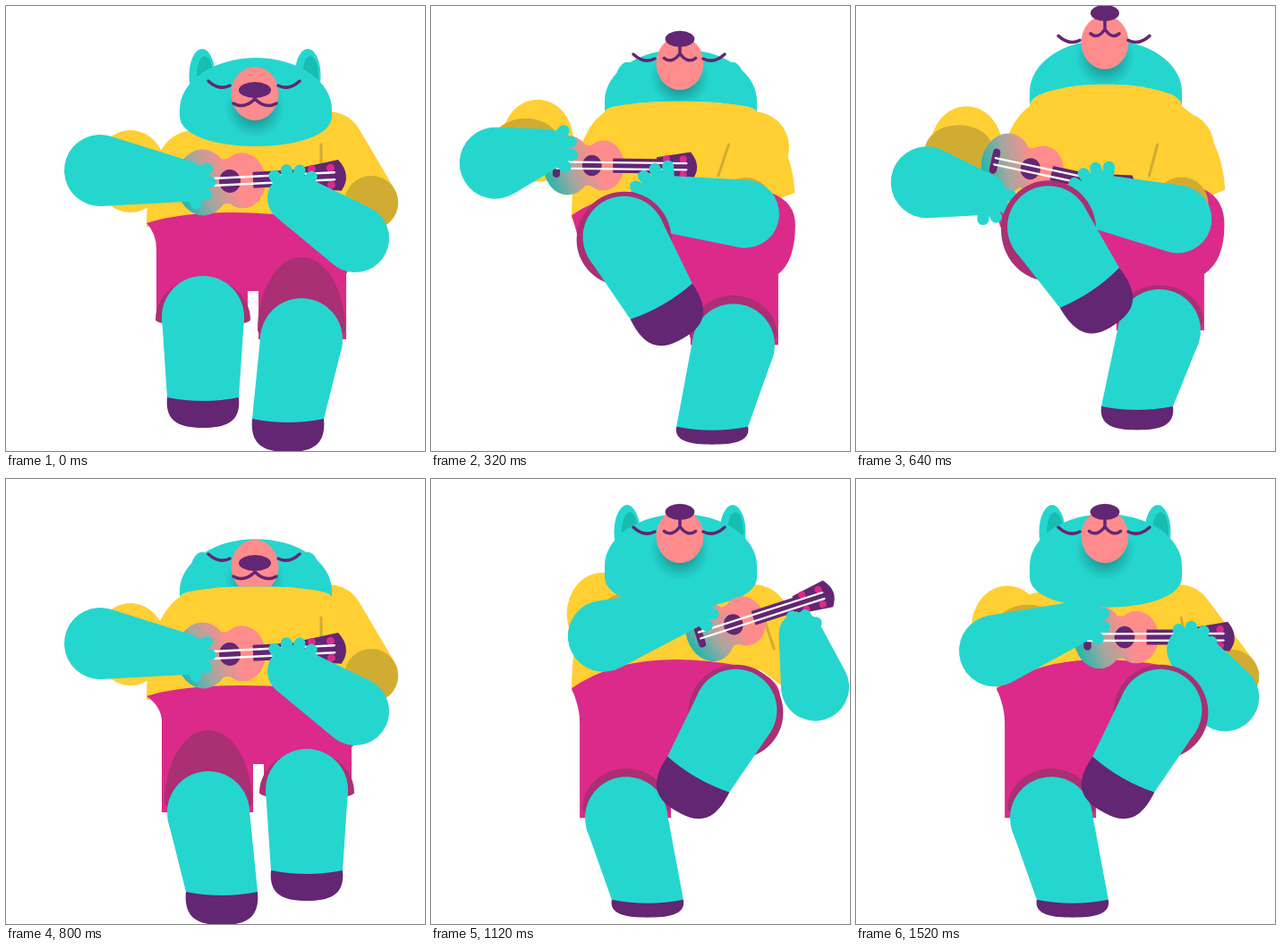
These frames come from a looping animation (468x498 px, 1.6 s). An HTML page with a canvas:

```html
<!DOCTYPE html>
<html lang="en">
<head>
<meta charset="utf-8">
<title>Dancing bear</title>
<style>
  html, body { margin: 0; width: 100%; height: 100%; overflow: hidden; background: #fff; }
  canvas { display: block; }
</style>
</head>
<body>
<canvas id="stage" width="468" height="498"></canvas>
<script>
const ctx = document.getElementById('stage').getContext('2d');
const TEAL = '#25d6cf', TEAL_DARK = '#17bdb0', YELLOW = '#ffcf33', MUSTARD = '#d1ac33',
      PINK = '#dc2a8a', PLUM = '#aa2f73', PURPLE = '#632673', SALMON = '#ff8c8c';
const { PI, sin, cos, abs, max, min, sqrt, sign } = Math;
const LOOP = 1600, STEP = 80, BEAT = 5; // one beat is five steps
const AXIS = 556;                       // x + mirrored x
const ANKLE = 40;                       // half width of an ankle

const mix = (a, b, u) => a + (b - a) * u;

function fill(color, draw) {
  ctx.beginPath();
  draw();
  ctx.closePath();
  ctx.fillStyle = color;
  ctx.fill();
}
function stroke(color, width, draw) {
  ctx.beginPath();
  draw();
  ctx.lineCap = ctx.lineJoin = 'round';
  ctx.lineWidth = width;
  ctx.strokeStyle = color;
  ctx.stroke();
}
function within(place, draw) {
  ctx.save();
  place();
  draw();
  ctx.restore();
}
const line = (x1, y1, x2, y2) => { ctx.moveTo(x1, y1); ctx.lineTo(x2, y2); };
const oval = (color, x, y, rx, ry = rx) => fill(color, () => ctx.ellipse(x, y, rx, ry, 0, 0, 2 * PI));

// Hull of two circles
function capsule(color, a, b) {
  const axis = Math.atan2(b.y - a.y, b.x - a.x);
  const bend = Math.acos((a.r - b.r) / Math.hypot(b.x - a.x, b.y - a.y));
  fill(color, () => {
    ctx.arc(a.x, a.y, a.r, axis + bend, axis - bend + 2 * PI);
    ctx.arc(b.x, b.y, b.r, axis - bend, axis + bend);
  });
}

// Sideways swing of arms and ukulele: left in the first half, right in the second
function sway(t) {
  const v = -sin(2 * PI * t / LOOP);
  return sign(v) * sqrt(abs(v));
}

function getPose(t) {
  const step = t / STEP, beat = step % BEAT, c = beat / BEAT;
  const swing = sway(t), reach = abs(swing);
  const turn = 2 * PI * t / LOOP;
  return {
    swing, reach,
    flipped: t >= LOOP / 2,
    lift: sin(PI * c) ** .25,
    bounce: cos(2 * PI * (c + .15)),
    point: sin(2 * PI * c),
    nod: ((c - .48) / .48) ** 2,
    strum: -30 * cos(PI * beat) * sin(PI * c),
    lean: max(0, -sway(t - 2 * STEP)),
    tilt: -.05 + .17 * (sin(turn) - sin(2 * turn)),
    rock: sin(2 * turn)
  };
}

// Legs are set out with the left one lifted; the second half mirrors them.
function getLegs({ lift, bounce, point, flipped }) {
  const shin = .6 * lift, length = 90 - 8 * lift;
  const lifted = {
    x: mix(220, 215, lift), y: mix(348, 246, lift), flip: 1, tilt: shin,
    ankleX: sin(shin) * length, ankleY: cos(shin) * length, foot: 34 + 16 * lift,
    cuff: { y: 3, rx: 53, up: 47 + 8 * lift, down: 8 + 50 * lift }
  };
  const planted = {
    x: mix(330, 339, lift), y: 363 + 17 * bounce, flip: 1, tilt: 0,
    ankleX: mix(-15, -25, lift), ankleY: 85 + 7 * bounce, foot: 37 + 18 * point,
    cuff: { y: -10, rx: 49, up: 40 + 42 * (1 - lift), down: 10 }
  };
  if (flipped) for (const leg of [lifted, planted]) {
    leg.x = AXIS - leg.x;
    leg.flip = -1;
  }
  const [left, right] = flipped ? [planted, lifted] : [lifted, planted];
  return { lifted, planted, left, right };
}

function drawLeg({ x, y, flip, tilt, ankleX, ankleY, foot, cuff }) {
  within(() => { ctx.translate(x, y); ctx.scale(flip, 1); }, () => {
    fill(PLUM, () => {
      ctx.ellipse(0, cuff.y, cuff.rx, cuff.up, 0, PI, 0);
      ctx.ellipse(0, cuff.y, cuff.rx, cuff.down, 0, 0, PI);
    });
    within(() => { ctx.translate(ankleX, ankleY); ctx.rotate(-tilt); }, () => fill(PURPLE, () => {
      ctx.moveTo(-ANKLE, 0);
      ctx.bezierCurveTo(-ANKLE - 3, foot * .85, -24, foot, 0, foot);
      ctx.bezierCurveTo(24, foot, ANKLE + 3, foot * .85, ANKLE, 0);
    }));
    const axis = Math.atan2(ankleX, ankleY), r = 46;
    const ax = ANKLE * cos(tilt), ay = ANKLE * sin(tilt);
    oval(TEAL, 0, 0, r);
    fill(TEAL, () => {
      ctx.moveTo(r * cos(axis), -r * sin(axis));
      ctx.lineTo(-r * cos(axis), r * sin(axis));
      ctx.lineTo(ankleX - ax, ankleY + ay);
      ctx.quadraticCurveTo(ankleX + 8 * sin(tilt), ankleY + 8 * cos(tilt), ankleX + ax, ankleY - ay);
    });
  });
}

function drawArm(elbow, hand, direction, length) {
  capsule(TEAL, elbow, hand);
  for (let i = -1.5; i < 2; i++) {
    const a = direction + i * 15 / length;
    stroke(TEAL, 13, () => line(hand.x, hand.y, hand.x + cos(a) * length, hand.y + sin(a) * length));
  }
}

function drawUkulele({ x, y, scale }, tilt) {
  within(() => { ctx.translate(x, y); ctx.rotate(tilt); ctx.scale(scale, scale); }, () => {
    const wood = ctx.createLinearGradient(-55, 20, 15, -8);
    wood.addColorStop(0, '#22b7ac');
    wood.addColorStop(.4, '#a5a79f');
    wood.addColorStop(.85, SALMON);
    oval(wood, -30, 0, 30, 37);
    oval(wood, 14, 0, 26, 31);
    fill(wood, () => ctx.rect(-20, -25, 25, 50));
    oval(PURPLE, 0, 0, 12, 13);
    stroke(PURPLE, 9, () => line(-44, -11, -44, 11));
    fill(PURPLE, () => ctx.rect(26, -9, 58, 18));
    fill(PURPLE, () => {
      ctx.moveTo(80, -11);
      ctx.lineTo(122, -18);
      ctx.quadraticCurveTo(137, 0, 124, 17);
      ctx.lineTo(80, 12);
    });
    for (const px of [92, 113]) for (const py of [-9, 10]) oval(PINK, px, py, 4.5);
    for (const sy of [-4, 4]) stroke('#fff', 2.5, () => line(-44, sy, 117, sy));
  });
}

function drawTorso({ neck, sag }, waist, lean) {
  const droop = max(sag, 0), left = 194 + droop / 4, right = 364 - droop / 4;
  const top = neck + droop / 2, rise = top + min(sag, 0) * 4 / 3;
  const side = 385 + 28 * lean;
  fill(YELLOW, () => {
    ctx.moveTo(left, top);
    ctx.bezierCurveTo(left, rise, right, rise, right, top);
    ctx.quadraticCurveTo(side - 4, neck + 30, side, waist.y);
    ctx.lineTo(waist.x, waist.y + 10);
    ctx.lineTo(157, waist.leftY + 4);
    ctx.quadraticCurveTo(157, neck + 25, left, top);
  });
}

function drawShorts(waist, { left, right }, lean) {
  const hip = 390 + 22 * lean, crotch = 319;
  const outerLeft = left.x - 52, outerRight = right.x + 50;
  fill(PINK, () => {
    ctx.moveTo(157, waist.leftY);
    ctx.quadraticCurveTo(225, waist.arch, waist.x, waist.y);
    ctx.quadraticCurveTo(hip, waist.y + 10, hip, 245);
    ctx.quadraticCurveTo(hip, 285, outerRight, min(300, right.y));
    ctx.lineTo(outerRight, right.y);
    ctx.lineTo(right.x - 48, right.y);
    ctx.lineTo(right.x - 48, crotch);
    ctx.lineTo(left.x + 50, crotch);
    ctx.lineTo(left.x + 50, left.y);
    ctx.lineTo(outerLeft, left.y);
    ctx.lineTo(outerLeft, min(272, left.y));
    ctx.quadraticCurveTo(outerLeft, 255, 157, waist.leftY);
  });
}

function drawEars({ top }, lean) {
  const y = top + 20 + 32 * lean;
  for (const x of [219, 337]) {
    oval(TEAL, x, y, 14.5, 30);
    oval(TEAL_DARK, x + 3, y, 9, 22);
  }
}

function drawHead({ neck, sag, top }, nod) {
  const snap = nod * nod; // the nose drops late in the nod
  const muzzle = 37 + 61 * nod, nose = muzzle - 33 + 29 * snap;
  const mouth = muzzle - 12 + 21 * snap, half = 16 + 8 * snap, eyes = muzzle - 3 - 7 * nod;
  const dip = neck + sag * 4 / 3;
  fill(TEAL, () => {
    ctx.ellipse(279, top + 58, 85, 58, 0, PI, 0);
    ctx.lineTo(364, neck);
    ctx.bezierCurveTo(364, dip, 194, dip, 194, neck);
  });
  const shadowY = muzzle + 16;
  const shade = ctx.createRadialGradient(278, shadowY, 12, 278, shadowY, 34);
  shade.addColorStop(0, 'rgba(20, 105, 105, .6)');
  shade.addColorStop(1, 'rgba(20, 140, 140, 0)');
  // Nothing of the face reaches below the collar.
  within(() => { ctx.beginPath(); ctx.rect(194, 0, 170, neck + sag); ctx.clip(); }, () => {
    oval(shade, 278, shadowY, 34);
    oval(SALMON, 278, muzzle, 26.5, 30);
  });
  stroke(PURPLE, 3.5, () => {
    line(278, nose, 278, mouth - 3);
    for (const dir of [-1, 1]) {
      ctx.moveTo(278, mouth - 3);
      ctx.quadraticCurveTo(278 + dir * half / 2, mouth + 9, 278 + dir * half, mouth + 2);
      const eye = 277 + dir * 39;
      ctx.moveTo(eye + dir * 12, eyes - 4);
      ctx.quadraticCurveTo(eye, eyes + 7, eye - dir * 12, eyes + 1);
    }
  });
  oval(PURPLE, 278, nose, 16 + 2 * snap, 9);
}

function draw() {
  const pose = getPose(Math.floor(performance.now() % LOOP / STEP) * STEP);
  const { swing, reach, lift, nod, lean, strum, tilt, rock } = pose;
  const legs = getLegs(pose);
  const head = { neck: 99 + 24 * nod + 12 * lean, sag: 34 - 60 * lean, top: 24 + 34 * nod + 12 * lean };
  const waist = { x: 345 + 45 * lean, y: 238 - 33 * lift, leftY: 243 - 10 * lift, arch: 222 - 40 * lift };
  const ukulele = { x: 250 + 81 * swing + 9 * reach, y: 196 - 26 * reach - 8 * swing, scale: 1 - .1 * reach };

  const leftElbow = { x: 105 + 62 * swing + 28 * reach, y: 184 - 14 * rock, r: 40 };
  const leftHand = { x: ukulele.x - 50, y: ukulele.y + strum, r: 23 };
  const rightElbow = { x: 390 + 40 * swing, y: 260 - 28 * reach, r: 38 };
  const rightHand = { x: 320 + 75 * swing + 20 * reach, y: 215 - 18 * reach - 25 * swing, r: 28 - 4 * swing };

  const leftSleeve = { x: 76 + .6 * leftElbow.x, y: 185 - 35 * reach };
  const shoulder = { x: 360, y: 158, r: 40 };
  const rightCuff = { x: rightElbow.x + 18 * (1 - reach), y: rightElbow.y - 40 + 30 * reach, r: 30 };

  ctx.fillStyle = '#fff';
  ctx.fillRect(0, 0, 468, 498);
  drawEars(head, lean);
  oval(YELLOW, leftSleeve.x, leftSleeve.y, 40, 46);
  capsule(YELLOW, shoulder, rightCuff);
  drawTorso(head, waist, lean);
  stroke(MUSTARD, 3, () => line(352 + 20 * swing, 155, 352 + 32 * swing, 190));
  drawShorts(waist, legs, lean);
  oval(MUSTARD, leftSleeve.x + 10 + 24 * swing, leftSleeve.y + 3, 38, 28);
  oval(MUSTARD, rightCuff.x, rightCuff.y, rightCuff.r);
  drawHead(head, nod);
  drawUkulele(ukulele, tilt);
  drawArm(leftElbow, leftHand, .3 + .02 * strum, 28);
  drawArm(rightElbow, rightHand, -1.55 + .6 * swing, 32 - 11 * swing);
  drawLeg(legs.planted);
  drawLeg(legs.lifted);
  requestAnimationFrame(draw);
}
draw();
</script>
</body>
</html>
```
